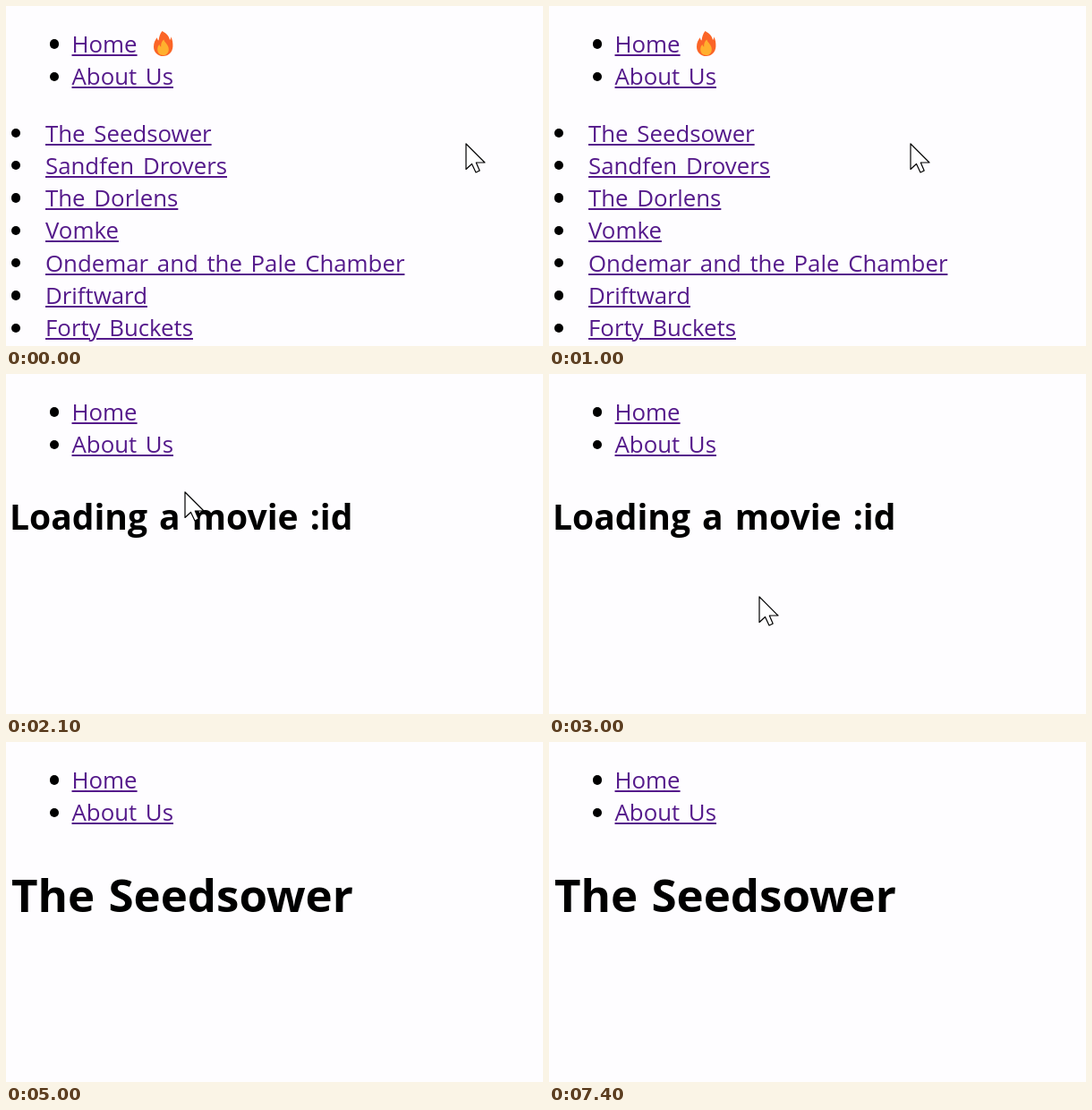
Recreate the animation shown at these times as an HTML page. Size 600 by 380 pixels, loop 7500 ms.

```html
<!DOCTYPE html>
<html lang="en">
<head>
<meta charset="utf-8">
<title>Movie list</title>
<style>
  html, body { margin: 0; width: 100%; height: 100%; overflow: hidden; background: #fefdff; }
  #stage { position: relative; width: 600px; height: 380px; overflow: hidden;
    font-family: "Open Sans", "Noto Sans", sans-serif; color: #000; }
  .link, .head { position: absolute; white-space: pre; }
  .link { font-size: 25.8px; line-height: 36px; word-spacing: 3px; color: #551a8b;
    text-decoration: underline; text-decoration-thickness: 2px; text-underline-offset: 2px; }
  .dot { position: absolute; width: 10.4px; height: 10.4px; border-radius: 50%; background: #000; }
  .head { font-weight: 700; line-height: 1; }
  #loading { left: 4px; top: 132px; font-size: 39px; line-height: 54px; word-spacing: 3px; }
  #movie { left: 6px; top: 135px; font-size: 51px; line-height: 70px; word-spacing: 2px; }
  svg { position: absolute; left: 0; top: 0; }
  .cursor { fill: #fff; stroke: #000; stroke-width: 1.2; stroke-linejoin: round; stroke-linecap: round; }
</style>
</head>
<body>
<div id="stage">
  <div id="nav"></div>
  <div id="home">
    <svg width="600" height="380">
      <path fill="#fb6527" d="M174.5 28C180 31 182.5 34.5 183 38C184 37 184.3 35.6 184.2 34.3C186 37.5 186.6 41.5 186.4 45.2C186 51.6 181.6 56 175.6 56C169.4 56 165 51.4 165 45.4C165 41 167 37.6 168.8 35.2C169 36.8 169.5 37.8 170.5 38.6C171 34.5 172 31 174.5 28Z"/>
      <path fill="#ffb02e" d="M176.4 37.6C177 41 181.8 43.4 181.8 48.4C181.8 52.4 179.2 55 175.6 55C171.8 55 169.2 52.4 169.2 48.6C169.2 46.2 170.2 44.2 171.4 43C171.6 44.2 172.2 45.2 173.2 45.6C172.9 42.2 174 39.4 176.4 37.6Z"/>
    </svg>
  </div>
  <div id="loading" class="head">Loading a movie :id</div>
  <div id="movie" class="head">The Seedsower</div>
  <svg width="600" height="380">
    <g id="pointer" class="cursor">
      <path id="arrow" d="M0 0V28.5L6.5 22.5L11 32L15.2 30L11.3 21H21Z"/>
      <g id="hand">
        <path d="M-3 21V2Q-3 -1 0 -1T3 2V13Q3 10 5.5 10T8 13.5Q8.5 11 10.5 11.2T13 15Q13.5 13 15.2 13.5T17 17V24Q17 29 14.5 32Q13 34 13 37.5H-1.5Q-2 34 -5 30L-10 23Q-11.5 20 -9 19.2Q-7 18.6 -5 20.5Z"/>
        <path fill="none" d="M3 12V19M8 13V19M13 15V20"/>
      </g>
    </g>
  </svg>
</div>
<script>
const LOOP = 7500, STEP = 100;
const CLICK = 2100, LOADED = 4500, POINTER_GONE = 4900;
const ROW = 36.3;
const titles = ["The Seedsower", "Sandfen Drovers", "The Dorlens", "Vomke",
  "Ondemar and the Pale Chamber", "Driftward", "Forty Buckets"];

// time, x, y of the pointer's hot spot
const path = [
  [0, 514, 154], [400, 514, 154], [600, 494, 154], [800, 449, 154], [1000, 404, 154],
  [1300, 308, 150], [1600, 215, 137], [1800, 200, 132], [2200, 200, 132],
  [2500, 330, 220], [2700, 472, 270], [2850, 380, 281], [3000, 235, 249],
  [3200, 300, 256], [3300, 360, 266], [3500, 343, 274]
];

const $ = id => document.getElementById(id);

function addList(parent, items, textX, dotX, baseline) {
  items.forEach((text, i) => {
    const y = baseline + i * ROW;
    parent.insertAdjacentHTML("beforeend",
      `<i class="dot" style="left:${dotX - 5.2}px;top:${y - 14.7}px"></i>` +
      `<span class="link" style="left:${textX}px;top:${y - 28}px">${text}</span>`);
  });
}

function pointerAt(t) {
  const i = path.findIndex(p => p[0] > t);
  if (i < 0) return path[path.length - 1].slice(1);
  const [t0, x0, y0] = path[i - 1], [t1, x1, y1] = path[i];
  const k = (t - t0) / (t1 - t0);
  return [x0 + (x1 - x0) * k, y0 + (y1 - y0) * k];
}

function show(id, on) {
  $(id).style.display = on ? "" : "none";
}

function draw(now) {
  const t = Math.floor((now % LOOP) / STEP) * STEP;
  const [x, y] = pointerAt(t);
  const home = t < CLICK;
  const overLink = home && x < 225 && y < 160;
  show("home", home);
  show("loading", !home && t < LOADED);
  show("movie", t >= LOADED);
  show("pointer", t < POINTER_GONE);
  show("hand", overLink);
  show("arrow", !overLink);
  $("pointer").setAttribute("transform", `translate(${x} ${y})`);
}

addList($("nav"), ["Home", "About Us"], 73.5, 54, 52);
addList($("home"), titles, 44, 11, 151.5);

const start = performance.now();
function tick() {
  draw(performance.now() - start);
  requestAnimationFrame(tick);
}
tick();
</script>
</body>
</html>
```
